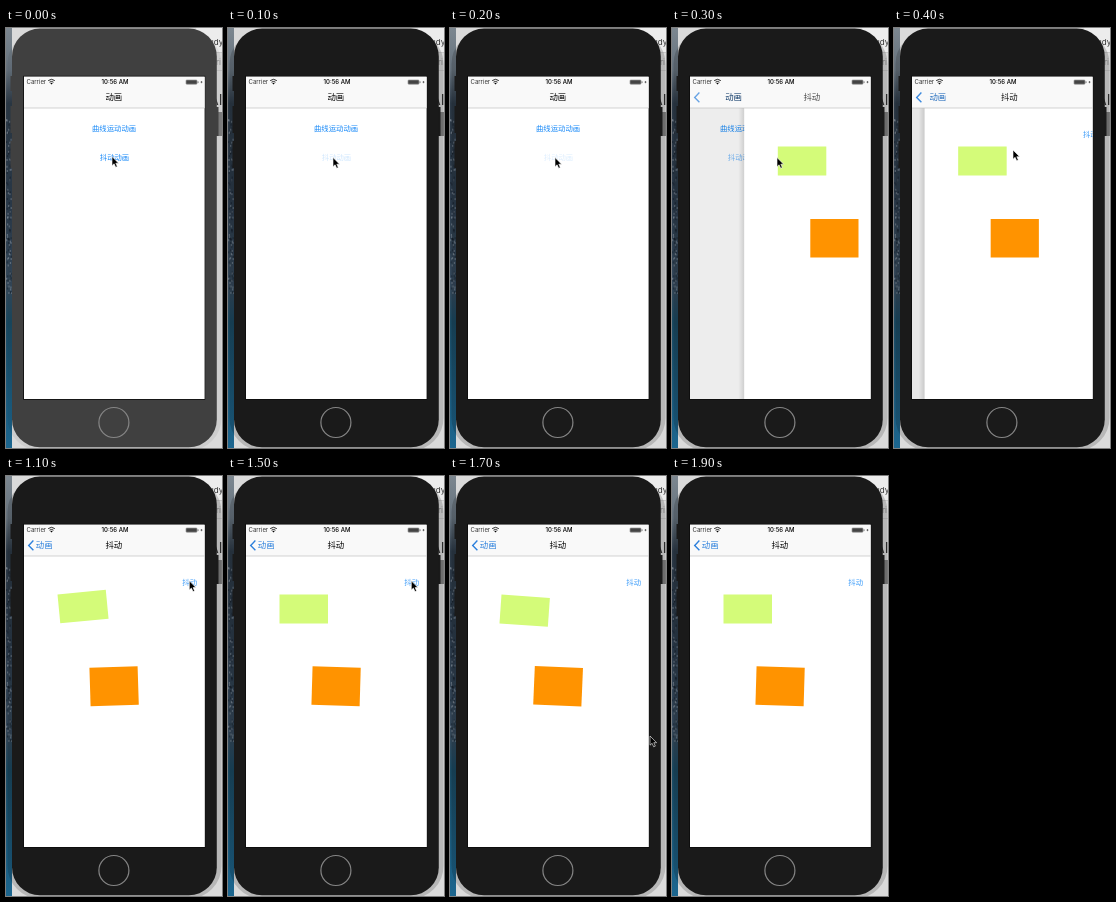
Recreate the animation shown at these times as an HTML page. Size 216 by 420 pixels, loop 2000 ms.

```html
<!DOCTYPE html>
<html lang="zh">
<head>
<meta charset="utf-8">
<title>抖动动画</title>
<style>
html, body { margin: 0; width: 100%; height: 100%; overflow: hidden; background: #ddd; }
svg { display: block; width: 216px; height: 420px; }
text { font-family: "Noto Sans CJK SC", "Noto Sans CJK", "Noto Sans CJK JP", "Noto Sans", sans-serif; }
.latin { font-family: Inter, Roboto, sans-serif; }
.link { font-size: 7.35px; fill: #1688f8; }
.title { font-size: 8.4px; font-weight: 500; text-anchor: middle; }
</style>
</head>
<body>
<svg viewBox="0 0 216 420">
  <defs>
    <linearGradient id="sea" x2="0" y2="1">
      <stop offset="0" stop-color="#7c8790"/>
      <stop offset=".1" stop-color="#65717c"/>
      <stop offset=".18" stop-color="#2c3946"/>
      <stop offset=".4" stop-color="#2b3a4a"/>
      <stop offset=".62" stop-color="#35495b"/>
      <stop offset=".7" stop-color="#1a4961"/>
      <stop offset="1" stop-color="#1c668f"/>
    </linearGradient>
    <linearGradient id="edge">
      <stop offset="0" stop-color="#000" stop-opacity="0"/>
      <stop offset="1" stop-color="#000" stop-opacity=".13"/>
    </linearGradient>
    <clipPath id="screen"><rect x="18" y="48.7" width="180.6" height="322.3"/></clipPath>
    <clipPath id="content"><rect x="18" y="80" width="181" height="291"/></clipPath>
  </defs>

  <!-- desktop -->
  <rect width="216" height="420" fill="#dadada"/>
  <rect x="190" width="26" height="24" fill="#ececec"/>
  <path d="M190 24.5H216M190 42.5H216" stroke="#c8c8c8"/>
  <rect x="205" y="84" width="11" height="24" fill="#808080"/>
  <g fill="#333">
    <text class="latin" x="203" y="17" font-size="8">udy</text>
    <text class="latin" x="210" y="37" font-size="8" fill="#888">ri</text>
    <text class="latin" x="203" y="76.5" font-size="14">AI</text>
  </g>
  <rect width="6" height="420" fill="url(#sea)"/>
  <g id="foam"></g>
  <rect id="shadow" x="4" y="6" width="209" height="414" rx="30" fill="none" stroke="#000" stroke-width="5"/>

  <!-- phone -->
  <g id="phone">
    <path d="M4.5 48h3v15h-3zM4.5 78h3v27h-3zM4.5 113h3v27h-3zM209 79h3.5v29h-3.5z"/>
    <rect x="6" y=".5" width="204.8" height="418.8" rx="28"/>
  </g>
  <rect x="17.2" y="47.8" width="182" height="324" fill="#0c0c0c"/>
  <circle cx="107.9" cy="394.5" r="15" fill="none" stroke="#858585" stroke-width="1.2"/>

  <g clip-path="url(#screen)">
    <rect x="18" y="48" width="181" height="323" fill="#fff"/>
    <g clip-path="url(#content)">
      <g id="list">
        <text class="link" x="86" y="103.3">曲线运动动画</text>
        <text class="link" id="tapped" x="93.8" y="132.3">抖动动画</text>
      </g>
      <rect id="dim" x="18" y="80" width="181" height="291"/>
      <g id="detail">
        <rect id="edgeShade" x="12" y="80" width="6" height="291" fill="url(#edge)"/>
        <rect x="18" y="80" width="181" height="291" fill="#fff"/>
        <text class="link" id="shake" x="176.3" y="109.3">抖动</text>
        <rect id="green" x="51.5" y="118.5" width="48.5" height="29" fill="#d4fb79"/>
        <rect id="orange" x="84" y="191" width="48.2" height="38.5" fill="#ff9300"/>
      </g>
    </g>
    <rect x="18" y="48" width="181" height="32" fill="#f9f9f9"/>
    <path d="M18 80H199" stroke="#b5b5b5" stroke-width=".6"/>

    <!-- status bar -->
    <text class="latin" x="20.5" y="56.2" font-size="6" fill="#333">Carrier</text>
    <path d="M42.2 52.6q3.3-2.6 6.6 0M43.5 54.2q2-1.5 4 0" fill="none" stroke="#111" stroke-width=".9"/>
    <path d="M44.3 55.2q1.2-.9 2.4 0l-1.2 1.3z"/>
    <text class="latin" x="109" y="56.2" font-size="6" font-weight="500" text-anchor="middle">10:56 AM</text>
    <rect x="180" y="52" width="11" height="4.2" rx=".8" fill="#444" stroke="#999" stroke-width=".7"/>
    <path d="M192 53.3v1.8" stroke="#777"/>
    <path d="M194.5 54.1h2M195.5 53v2.2" stroke="#333" stroke-width=".6"/>

    <path id="chevron" d="M27.4 64.6L22.7 69.4L27.4 74.2" fill="none" stroke="#2d80dc" stroke-width="1.4"/>
    <text class="title" id="back" y="72.3">动画</text>
    <text class="title" id="heading" y="72.3">抖动</text>
  </g>

  <path id="cursor" d="M0 0V9.2L2.1 7.3L3.7 10.8L5.3 10.1L3.8 6.7H6.6Z" stroke="#fff" stroke-width=".6"/>
</svg>
<script>
const STEP = 100, COUNT = 20;
const el = id => document.getElementById(id);
const set = (id, attrs) => {
  for (const name in attrs) el(id).setAttribute(name, attrs[name]);
};
const mix = (a, b, p) => a + (b - a) * p;
const mixColor = (a, b, p) => `rgb(${a.map((v, i) => Math.round(mix(v, b[i], p)))})`;

// Rocks and foam on the wallpaper strip.
let seed = 7;
const random = () => (seed = seed * 16807 % 2147483647) / 2147483647;
el("foam").innerHTML = Array.from({ length: 110 }, () => {
  const fill = random() < .5 ? "#aab4bd" : "#0d1620";
  return `<rect x="${random() * 5}" y="${90 + random() * 175}" width="1.2" height="2" fill="${fill}" opacity=".4"/>`;
}).join("");

// Values per step; the last one is held.
const push = [0, 0, 0, .7, .93, .985, 1];
const tapFade = [1, .2, .14, .6, 1];
const pointer = [
  [106, 128.5], [105, 129.5], [105, 129.5], [105, 129.5], [119, 122], [149, 109], [179, 100],
  [190, 99.5], [187, 102], [183.3, 104.8]
];
const greenTilt = [0, 3, -5.5, 4, -3, 3, 0, -4, 4, -1.8, 0];
const SHAKE_START = 9, LEAVE = 17;
const at = (list, i) => list[Math.min(i, list.length - 1)];

function draw(step) {
  const p = at(push, step);
  const offset = 181 * (1 - p);
  set("phone", { fill: step ? "#1a1a1a" : "#404040" });
  set("shadow", { opacity: step ? .16 : .06 });
  set("list", { transform: `translate(${-54.3 * p})` });
  set("tapped", { opacity: at(tapFade, step) });
  set("dim", { opacity: .1 * p });
  set("detail", { transform: `translate(${offset})` });
  set("edgeShade", { opacity: p > 0 ? 1 : 0 });
  set("chevron", { opacity: p });
  set("back", {
    x: mix(107.8, 38.2, Math.pow(p, 1.15)),
    fill: mixColor([0, 0, 0], [45, 128, 220], p * p),
    "font-weight": p === 1 ? 400 : 500
  });
  set("heading", { x: 107.8 + offset * .59, opacity: p });

  const beat = step - SHAKE_START;
  const orangeTilt = beat > 0 ? 2.4 * Math.cos(2.74 * (step - 17)) : 0;
  set("green", { transform: `rotate(${beat < 0 ? 0 : at(greenTilt, beat)} 51.5 118.5)` });
  set("orange", { transform: `rotate(${orangeTilt} 108.1 210.25)` });
  set("shake", { opacity: beat === 0 ? .3 : .85 });

  const [x, y] = step === LEAVE ? [200, 260] : at(pointer, step);
  set("cursor", {
    transform: `translate(${x} ${y})`,
    visibility: step > LEAVE ? "hidden" : "visible"
  });
}

const start = performance.now();
function tick() {
  draw(Math.floor((performance.now() - start) / STEP) % COUNT);
  requestAnimationFrame(tick);
}
tick();
</script>
</body>
</html>
```
